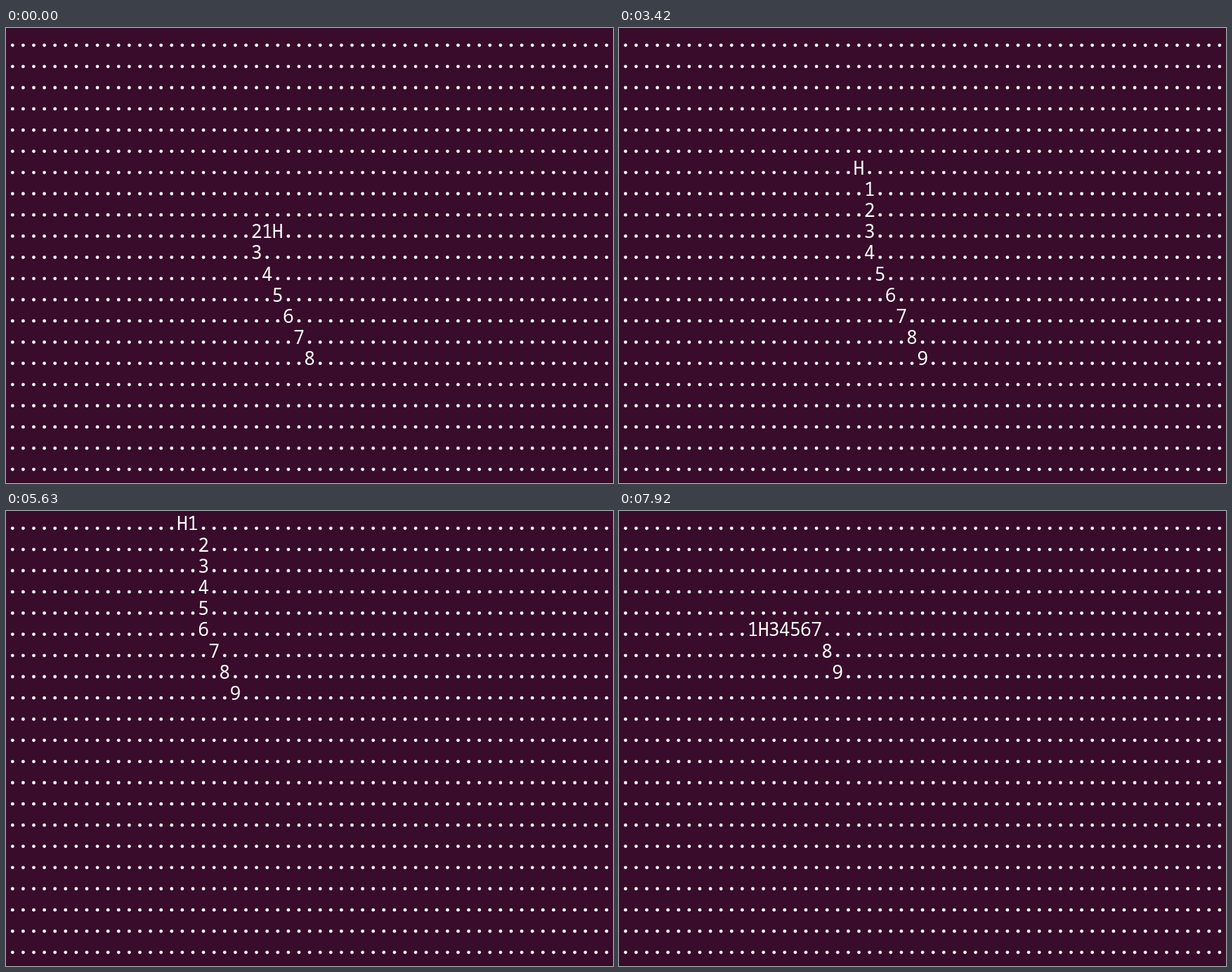
Recreate the animation shown at these times as an HTML page with a canvas. Size 864 by 648 pixels, loop 8000 ms.

```html
<!DOCTYPE html>
<html lang="en">
<head>
<meta charset="utf-8">
<title>Rope simulation</title>
<style>
  html, body { margin: 0; width: 100%; height: 100%; overflow: hidden; background: #380c2a; }
  canvas { display: block; }
</style>
</head>
<body>
<canvas id="stage" width="864" height="648"></canvas>
<script>
const ctx = document.getElementById("stage").getContext("2d");
const LOOP = 8000, COLS = 57, ROWS = 21;
const CELL_W = 15.1, CELL_H = 30.2, LEFT = 9.3, DOT_Y = 24.6, BASELINE = 27.4;
const LABELS = "H123456789";
const DIRS = { U: [0, -1], D: [0, 1], L: [-1, 0], R: [1, 0] };

// Knot positions as [column, row], head first.
const START = [[25, 9], [24, 9], [23, 9], [23, 10], [24, 11],
               [25, 12], [26, 13], [27, 14], [28, 15], [28, 15]];

// Head moves, spread evenly from the first time to the last (ms).
const RUNS = [
  [40, 790, "RUDDLLUU"],
  [880, 1080, "DDL"],
  [1500, 1500, "ULLR"],
  [1600, 2210, "DDRLRUU"],
  [2330, 3130, "UUUDDLUUR"],
  [3210, 3420, "RLL"],
  [3500, 4000, "UULLRL"],
  [4130, 4880, "DUULLUURL"],
  [5000, 5000, "R"],
  [5080, 5710, "ULLLDUD"],
  [5830, 6290, "DDLLLD"],
  [6420, 6630, "LRR"],
  [6750, 7000, "DUU"],
  [7500, 7500, "LLDDL"],
  [7610, 7920, "RRLR"]
];

// Each knot steps towards the one ahead once they stop touching.
function moveRope(rope, dir) {
  const [dx, dy] = DIRS[dir];
  const next = [[rope[0][0] + dx, rope[0][1] + dy]];
  for (let i = 1; i < rope.length; i++) {
    const [x, y] = rope[i];
    const gapX = next[i - 1][0] - x, gapY = next[i - 1][1] - y;
    const apart = Math.max(Math.abs(gapX), Math.abs(gapY)) > 1;
    next.push(apart ? [x + Math.sign(gapX), y + Math.sign(gapY)] : [x, y]);
  }
  return next;
}

const states = [{ time: 0, rope: START }];
for (const [from, to, moves] of RUNS) {
  [...moves].forEach((dir, i) => {
    const time = Math.round(from + (to - from) * i / Math.max(1, moves.length - 1));
    states.push({ time, rope: moveRope(states[states.length - 1].rope, dir) });
  });
}

function draw(rope) {
  ctx.fillStyle = "#380c2a";
  ctx.fillRect(0, 0, 864, 648);
  ctx.fillStyle = "#2f0a24";
  ctx.fillRect(0, 646.5, 864, 1.5);

  const labels = new Map();
  rope.forEach(([col, row], i) => {
    const cell = row * COLS + col;
    if (!labels.has(cell)) labels.set(cell, LABELS[i]);
  });

  ctx.fillStyle = "#fff";
  ctx.font = '26.5px "Noto Sans Mono", "DejaVu Sans Mono", monospace';
  ctx.textAlign = "center";
  ctx.textBaseline = "alphabetic";
  for (let row = 0; row < ROWS; row++) {
    for (let col = 0; col < COLS; col++) {
      const x = LEFT + col * CELL_W, y = row * CELL_H;
      const label = labels.get(row * COLS + col);
      if (label) {
        ctx.fillText(label, x, y + BASELINE);
      } else {
        ctx.beginPath();
        ctx.arc(x, y + DOT_Y, 2.4, 0, Math.PI * 2);
        ctx.fill();
      }
    }
  }
}

const startTime = performance.now();
let shown = null;
function frame() {
  const time = (performance.now() - startTime) % LOOP;
  const state = states.filter(s => s.time <= time).pop();
  if (state !== shown) draw((shown = state).rope);
  requestAnimationFrame(frame);
}
frame();
</script>
</body>
</html>
```
